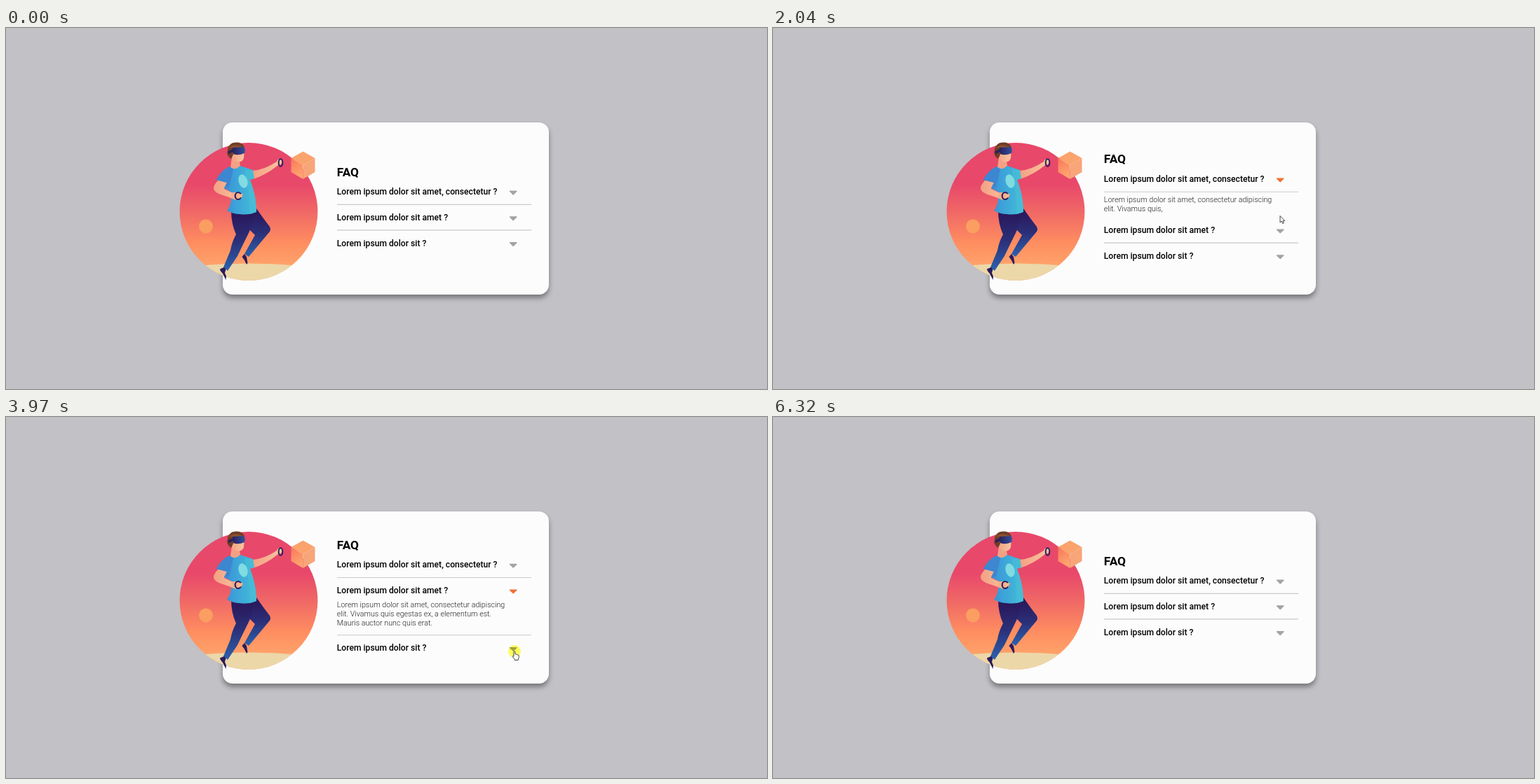
An HTML page that plays this animation: 1085 px wide and 516 px high, repeating every 7260 ms.

```html
<!DOCTYPE html>
<html lang="en">
<head>
<meta charset="utf-8">
<title>FAQ accordion</title>
<style>
  html, body { margin: 0; width: 100%; height: 100%; overflow: hidden; background: #c2c1c6; }
  .card { position: absolute; left: 308.5px; top: 135px; width: 465px; height: 246px;
    border-radius: 14px; background: #fcfcfc; box-shadow: 0 5px 7px rgba(0, 0, 0, .38); }
  svg { position: absolute; left: 0; top: 0; }
  text { font-family: Roboto, sans-serif; fill: #000; }
  .title { font-size: 17.3px; font-weight: 700; }
  .question { font-size: 12.13px; font-weight: 500; }
  .answer { font-size: 10.7px; font-weight: 300; fill: #222; }
  .rule { stroke: #cacaca; stroke-width: 1.1; }
  .caret { stroke-width: 1.4; stroke-linejoin: round; }
  #halo { mix-blend-mode: multiply; }
  #arrow, #hand { fill: #fff; stroke: #333; stroke-width: .9; stroke-linejoin: round; }
</style>
</head>
<body>
<div class="card"></div>
<svg width="1085" height="516" viewBox="0 0 1085 516">
  <defs>
    <linearGradient id="sky" x2="0" y2="1">
      <stop offset=".3" stop-color="#e8486a"/>
      <stop offset=".5" stop-color="#f06866"/>
      <stop offset=".72" stop-color="#fe8d60"/>
      <stop offset=".9" stop-color="#ffa46b"/>
    </linearGradient>
    <linearGradient id="shirt">
      <stop offset="0" stop-color="#3c7fce"/>
      <stop offset=".5" stop-color="#3da4d9"/>
      <stop offset="1" stop-color="#43bdd6"/>
    </linearGradient>
    <linearGradient id="pants" x2="0" y2="1">
      <stop offset=".1" stop-color="#2a1a5e"/>
      <stop offset=".5" stop-color="#2b2f78"/>
      <stop offset="1" stop-color="#2c62ad"/>
    </linearGradient>
    <linearGradient id="skin">
      <stop offset="0" stop-color="#f4a083"/>
      <stop offset="1" stop-color="#fac6a0"/>
    </linearGradient>
    <linearGradient id="peach" x2=".3" y2="1">
      <stop offset="0" stop-color="#f8775b"/>
      <stop offset="1" stop-color="#ffa56f"/>
    </linearGradient>
    <linearGradient id="visor">
      <stop offset="0" stop-color="#28205f"/>
      <stop offset="1" stop-color="#33509c"/>
    </linearGradient>
    <clipPath id="disc"><circle cx="346" cy="262.5" r="98.4"/></clipPath>
  </defs>

  <g clip-path="url(#disc)">
    <rect x="247" y="164" width="198" height="198" fill="url(#sky)"/>
    <path d="M270 340Q346 333 422 340V365H270Z" fill="#ecd7a9"/>
  </g>
  <circle cx="285" cy="283.5" r="10" fill="#fb9e61"/>

  <path d="M423.5 176.5L440.5 186L423.5 196L406.5 186Z" fill="#fba36c"/>
  <path d="M406.5 186L423.5 196V216L406.5 206Z" fill="url(#peach)"/>
  <path d="M440.5 186L423.5 196V216L440.5 206Z" fill="#f7a579"/>

  <!-- legs and shoes -->
  <path d="M336 260L357 258Q366 271 376 284Q378 288 376 291L346 327L340 323L355 296L339 280Z" fill="url(#pants)"/>
  <path d="M321 260Q321 280 328 295Q322 306 320 318L310 342L316 347L330 326Q338 309 346 293Q354 277 352 262Z" fill="url(#pants)"/>
  <path d="M340 323L336.500 327Q340 331 343 338L344.500 336L343 327ZM311 342L305 344.500Q305 347 309 351L313.500 360L314 355L312 350L313.500 345Z" fill="#2a1b5c"/>

  <!-- raised arm, neck and head -->
  <path d="M351 204Q368 203 386 191Q387 187 392 187L395 190Q394 195 388 196Q371 210 352 216Z" fill="url(#skin)"/>
  <ellipse cx="391.500" cy="192.500" rx="2.800" ry="5.200" fill="none" stroke="#2a2262" stroke-width="2"/>
  <path d="M322 185L320 199Q326 206 334 197L333 190Z" fill="#f3a184"/>
  <path d="M320 173L340 174L339 186Q337 193 329 191Q321 188 320 180Z" fill="url(#skin)"/>
  <path d="M321 187Q313 182 316 174Q317 164 328 163.500Q338 163 340 171L327 172Q323 175 324 181Z" fill="#6f3d27"/>
  <path d="M317 171Q326 164 340 171L326 171Z" fill="#8d5030"/>
  <path d="M323 171L339 170Q342 173 340 179Q331 183 324 180Z" fill="url(#visor)"/>
  <path d="M317 176L324 173V177L317 180Z" fill="#28205f"/>

  <!-- shirt and bent arm -->
  <path d="M304 216Q295 225 296 230Q298 236 309 239L327 245L335 242L337 237L328 234L326 237L311 230L317 219Z" fill="url(#skin)"/>
  <path d="M319 198Q325 205 334 197L352 203L354 215L348 217Q357 240 357 263Q346 268 333 266Q324 266 315 261Q322 251 321 242L326 237L311 229L315 221L300 217Q307 203 319 198Z" fill="url(#shirt)"/>
  <path d="M319 198L324 202L318 228L311 229L315 221L300 217Q307 203 319 198Z" fill="#3d86d0"/>
  <path d="M340 203L352 203L354 215L348 217Q357 240 357 263L347 266Q348 235 340 203Z" fill="#49bfd8" opacity=".55"/>
  <ellipse cx="338" cy="219" rx="6.300" ry="10" transform="rotate(-16 338 219)" fill="#80dbe2"/>
  <path d="M322 235L331 235L338 238L336 243L328 246L320 243Z" fill="#f6ad8b"/>
  <ellipse cx="331" cy="240" rx="4.300" ry="5" fill="none" stroke="#2a2262" stroke-width="2.200"/>
  <path d="M330 238L337 237L336 242L331 243Z" fill="#f7b792"/>

  <g id="faq"></g>
  <circle id="halo" r="9" fill="#ffff62"/>
  <path id="arrow" d="M0 0V9.600L2.200 7.600L3.700 11L5.300 10.300L3.900 7.100H6.800Z"/>
  <path id="hand" d="M-1.100 1C-1.100-.4 1-.4 1 1V4Q2.400 3.400 2.700 4.500Q4.100 4 4.400 5.200Q6.200 4.800 6.200 6.200V8.600Q6.200 10 5.200 11V12.500H.2V11.500Q-1 10-2.900 7.400Q-2.600 5.800-1.100 7.200Z"/>
</svg>
<script>
const LOOP = 7260;
const $ = id => document.getElementById(id);
const lead = 'Lorem ipsum dolor sit amet, consectetur adipiscing';
const items = [
  { q: 'Lorem ipsum dolor sit amet, consectetur ?', gap: 28.8,
    a: [lead, 'elit. Vivamus quis,'] },
  { q: 'Lorem ipsum dolor sit amet ?', gap: 19.9,
    a: [lead, 'elit. Vivamus quis egestas ex, a elementum est.', 'Mauris auctor nunc quis erat.'] },
  { q: 'Lorem ipsum dolor sit ?', gap: 19.9,
    a: [lead, 'elit. Vivamus quis egestas ex.'] }
];
// Half the height that each opened answer adds to the centred list
const grow = [18.2, 22.9, 16.3];

// [time, opened item]
const opens = [[0, -1], [1700, 0], [2960, 1], [4090, 2], [5240, -1]];
// Mouse button held: [from, to]
const clicks = [[1640, 1700], [2890, 2960], [3970, 4090], [5170, 5240]];

// Pointer moves: start, end, number of steps, shape, curve points
const moves = [
  [130, 820, 11, 'arrow', [978, 508], [760, 430], [545, 270], [703, 249]],
  [890, 1100, 4, 'arrow', [707.5, 247.5], [720, 239.5]],
  [1240, 1240, 1, 'hand', [723, 238]],
  [1700, 1700, 1, 'arrow', [723, 238]],
  [1900, 2040, 3, 'arrow', [723, 250], [723, 268.5]],
  [2170, 2290, 3, 'arrow', [723, 275], [722.5, 284]],
  [2430, 2490, 2, 'hand', [721, 285], [722, 288]],
  [2960, 2960, 1, 'arrow', [722, 288]],
  [3160, 3560, 7, 'arrow', [722, 290], [716, 310], [724, 329]],
  [3630, 3630, 1, 'hand', [725, 335]],
  [4090, 4090, 1, 'arrow', [725, 334]],
  [4350, 4830, 8, 'arrow', [728, 331], [736, 310], [729, 297]],
  [4900, 4900, 1, 'hand', [728, 292]],
  [5310, 5310, 1, 'arrow', [728, 292]],
  [5510, 6180, 11, 'arrow', [732, 296], [760, 318], [990, 490], [1005, 508]],
  [6250, 6250, 1, 'arrow', [1015, 510]],
  [6320, 6320, 1, 'none', [0, 0]]
];

const label = (cls, y, s) => `<text class="${cls}" x="471.8" y="${y}">${s}</text>`;

function drawList(open) {
  const shift = i => open < 0 ? 0 : i <= open ? -grow[open] : grow[open];
  let out = label('title', 211.5 + shift(0), 'FAQ');
  items.forEach(({ q, a, gap }, i) => {
    const y = 238 + 36.75 * i + shift(i);
    const color = i === open ? '#f26f33' : '#a3a3a3';
    out += label('question', y, q);
    out += `<path class="caret" fill="${color}" stroke="${color}" d="M718.500 ${y - 4.7}h9.400l-4.700 4.600z"/>`;
    if (i === open) a.forEach((s, n) => { out += label('answer', y + gap + 13.2 * n, s); });
    if (i < 2) {
      // The first rule stays above its answer, the second goes below
      const ruleY = 252.4 + 36.5 * i + (i === 1 && open === 1 ? grow[1] : shift(i));
      out += `<path class="rule" d="M472 ${ruleY}H749"/>`;
    }
  });
  $('faq').innerHTML = out;
}

function bezier(pts, u) {
  while (pts.length > 1)
    pts = pts.slice(1).map(([x, y], i) => [pts[i][0] + (x - pts[i][0]) * u, pts[i][1] + (y - pts[i][1]) * u]);
  return pts[0];
}

function pointer(t) {
  const move = moves.findLast(m => t >= m[0]);
  if (!move) return ['none', 0, 0];
  const [from, to, n, shape, ...pts] = move;
  const u = n > 1 ? Math.floor(Math.min(1, (t - from) / (to - from)) * (n - 1) + .01) / (n - 1) : 0;
  return [shape, ...bezier(pts, u)];
}

let shown;
function frame(now) {
  const t = now % LOOP;
  const open = opens.findLast(o => t >= o[0])[1];
  if (open !== shown) drawList(shown = open);

  const [shape, x, y] = pointer(t);
  const pressed = clicks.some(([a, b]) => t >= a && t < b);
  for (const id of ['arrow', 'hand', 'halo']) {
    $(id).setAttribute('transform', `translate(${x} ${y})`);
    $(id).style.display = id === shape || (id === 'halo' && pressed) ? '' : 'none';
  }
  requestAnimationFrame(frame);
}
frame(0);
</script>
</body>
</html>
```
